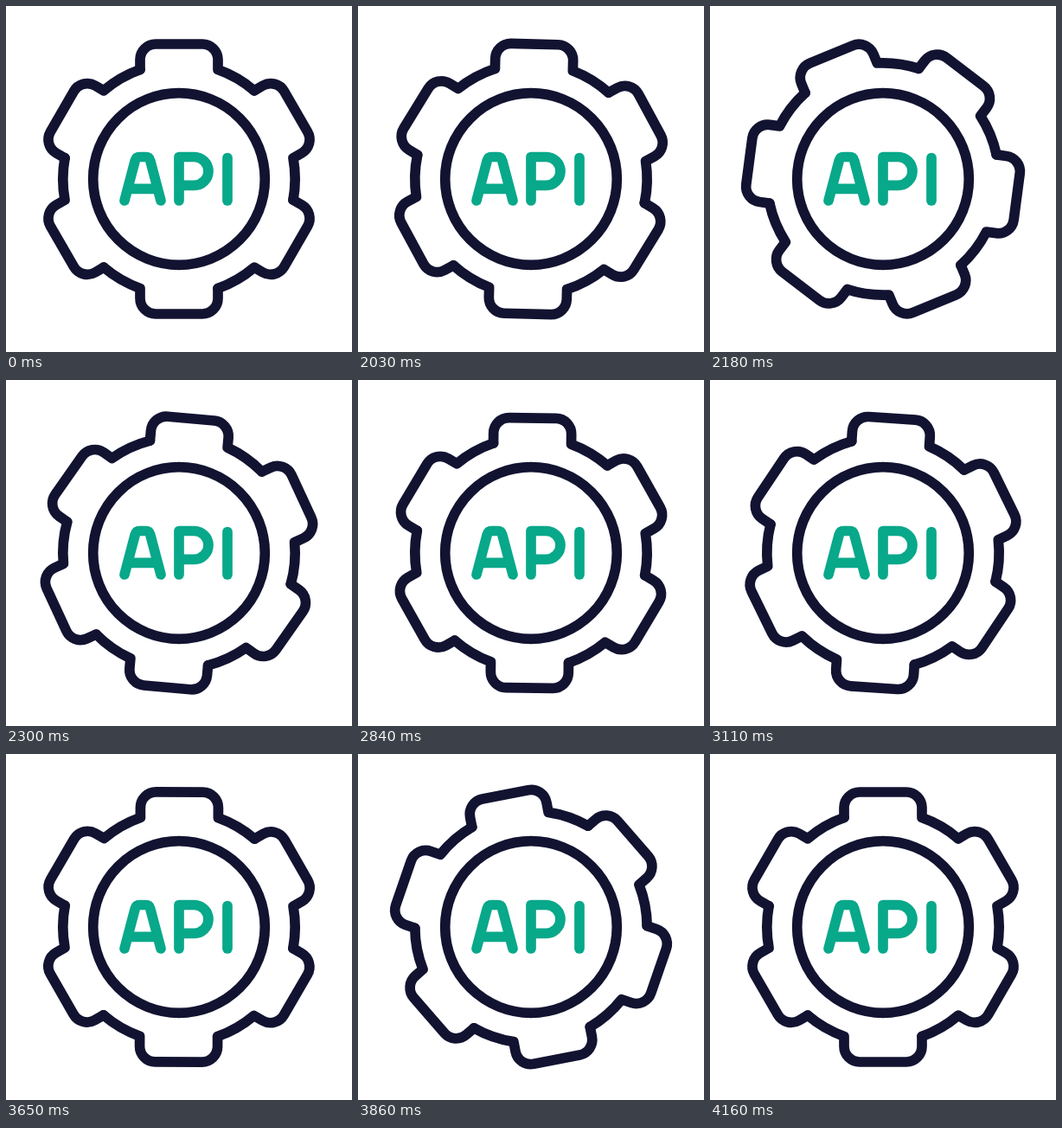
Animation, 400 px wide and 400 px high, one loop 4190 ms. Source, as an HTML page:

```html
<!DOCTYPE html>
<html lang="en">
<head>
<meta charset="utf-8">
<title>API gear</title>
<style>
  html, body { margin: 0; width: 100%; height: 100%; overflow: hidden; background: #fff; }
  svg { display: block; width: 100%; height: 100%; }
  svg * { fill: none; stroke-width: 11.7; stroke-linecap: round; stroke-linejoin: round; }
  .dark { stroke: #121331; }
  .green { stroke: #08a88a; }
</style>
</head>
<body>
<svg viewBox="0 0 400 400" role="img" aria-label="API">
  <defs>
    <path id="tooth" d="M-45-126.400V-138a18 18 0 0 1 18-18H27a18 18 0 0 1 18 18V-126.400A134.200 134.200 0 0 1 86.960-102.170"/>
  </defs>
  <g class="dark" transform="translate(200 200)">
    <g id="gear">
      <use href="#tooth"/>
      <use href="#tooth" transform="rotate(60)"/>
      <use href="#tooth" transform="rotate(120)"/>
      <use href="#tooth" transform="rotate(180)"/>
      <use href="#tooth" transform="rotate(240)"/>
      <use href="#tooth" transform="rotate(300)"/>
    </g>
    <circle r="99.3"/>
  </g>
  <g class="green">
    <path d="M137 225L149.3 178.5Q150.4 174.5 154.5 174.5H161.5Q165.6 174.5 166.7 178.5L179 225M141 211.3H175"/>
    <path d="M200 225V174.5H217.6a16.4 16.4 0 0 1 0 32.8H200"/>
    <path d="M256 175.5V225"/>
  </g>
</svg>
<script>
  const LOOP = 4190, STEP = 30;
  const START = 2000, PERIOD = 820, TURNS = 3;
  const PEAK_AT = 1000 / 3, REST_AT = 500;
  const PEAK = 67, REST = 60;
  const gear = document.getElementById('gear');

  const ease = x => x * x * (3 - 2 * x);

  // One turn swings past the next tooth, then settles back on it.
  function turnAngle(t) {
    if (t < PEAK_AT) return PEAK * ease(t / PEAK_AT);
    if (t < REST_AT) return PEAK + (REST - PEAK) * ease((t - PEAK_AT) / (REST_AT - PEAK_AT));
    return REST;
  }

  // Each pose is held for one step.
  function angleAt(time) {
    const t = Math.floor((time - START) / STEP) * STEP;
    if (t < 0) return 0;
    const turn = Math.min(Math.floor(t / PERIOD), TURNS - 1);
    return turn * REST + turnAngle(t - turn * PERIOD);
  }

  function draw(now) {
    gear.setAttribute('transform', `rotate(${angleAt(now % LOOP)})`);
    requestAnimationFrame(draw);
  }

  draw(performance.now());
</script>
</body>
</html>
```
